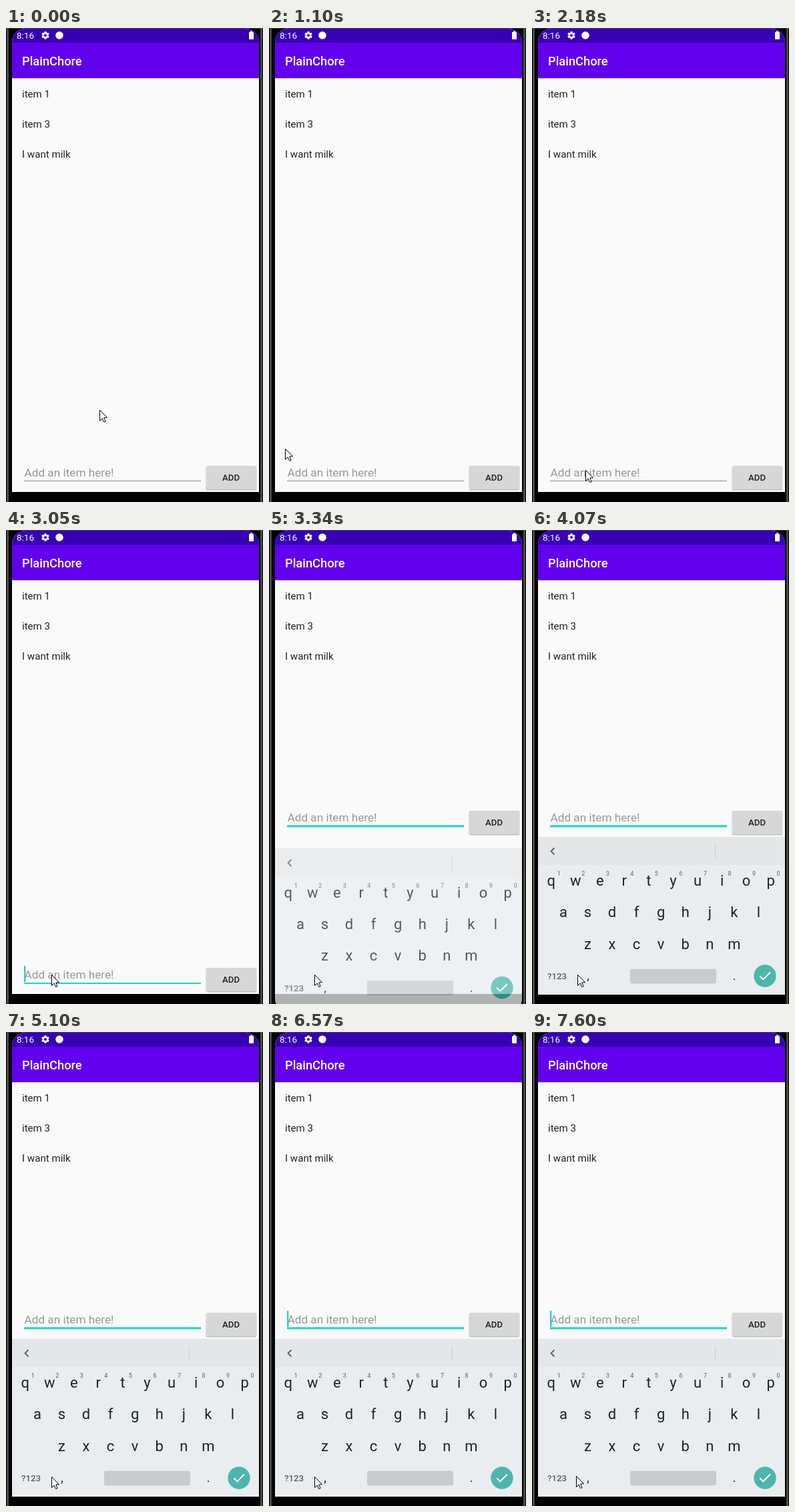
Animation, 385 px wide and 709 px high, one loop 8 s. Source, as an HTML page with a canvas:

```html
<!DOCTYPE html>
<html lang="en">
<head>
<meta charset="utf-8">
<title>To-do list</title>
<style>
html, body { margin: 0; width: 100%; height: 100%; overflow: hidden; background: #000; }
canvas { display: block; }
</style>
</head>
<body>
<canvas id="stage" width="385" height="709"></canvas>
<script>
const ctx = document.getElementById('stage').getContext('2d');
const LOOP = 8000, TICK = 125, BLINK = 493;
const FOCUS = 2480, KEYS_IN = 3340, KEYS_UP = 3480, BLINK_START = 3570;

// Pointer strokes: straight moves that advance one step per TICK
const STROKES = [
  { start: 305, steps: 4, from: [140, 571], to: [38, 617] },
  { start: 950, steps: 1, from: [38, 625], to: [24, 629] },
  { start: 1780, steps: 2, from: [36, 649], to: [80, 661] },
  { start: 2910, steps: 1, from: [71, 664], to: [68, 665] },
  { start: 6875, steps: 1, from: [68, 665], to: [66, 664] },
];

function rect(x, y, w, h, color, radius = 0) {
  ctx.fillStyle = color;
  ctx.beginPath();
  ctx.roundRect(x, y, w, h, radius);
  ctx.fill();
}

function disc(x, y, r, color) {
  ctx.fillStyle = color;
  ctx.beginPath();
  ctx.arc(x, y, r, 0, 2 * Math.PI);
  ctx.fill();
}

function line(points, color, width) {
  ctx.strokeStyle = color;
  ctx.lineWidth = width;
  ctx.beginPath();
  points.forEach(([x, y]) => ctx.lineTo(x, y));
  ctx.stroke();
}

function text(str, x, y, size, color, { weight = 400, spacing = 0, align = 'left' } = {}) {
  ctx.font = `${weight} ${size}px Roboto, sans-serif`;
  ctx.letterSpacing = spacing + 'px';
  ctx.textAlign = align;
  ctx.fillStyle = color;
  ctx.fillText(str, x, y);
}

function drawBezel() {
  rect(0, 0, 385, 709, '#000');
  rect(0, 0, 385, 1, '#444');
  rect(1, 0, 3, 709, '#4a4a4a');
  rect(381, 0, 3, 709, '#4a4a4a');
}

function drawGear(x, y) {
  for (let i = 0; i < 6; i++) {
    const a = (i + 0.5) * Math.PI / 3;
    line([[x, y], [x + 5.8 * Math.cos(a), y + 5.8 * Math.sin(a)]], '#fff', 3);
  }
  disc(x, y, 4.5, '#fff');
  disc(x, y, 2, '#3700b3');
}

function drawApp() {
  rect(9, 1, 370, 693, '#fafafa');
  rect(9, 75, 370, 1, '#dcd8e2');
  rect(9, 1, 370, 21, '#3700b3');
  rect(9, 22, 370, 53, '#6200ee');
  text('8:16', 16, 16, 13.5, '#fff');
  drawGear(59, 11);
  disc(80, 11, 5.8, '#fff');
  rect(364, 6, 7, 11, '#fff', 1);
  rect(366, 4.5, 3, 2, '#fff');
  text('PlainChore', 24, 56, 18.3, '#fff', { weight: 500 });
  ['item 1', 'item 3', 'I want milk'].forEach((item, i) =>
    text(item, 24, 103.5 + 45 * i, 15.1, '#222'));
}

function drawEntry(y, focused, raised, caret) {
  text('Add an item here!', 27.5, y + 19, 17.2, '#999');
  if (raised) rect(27, y + 24.5, 265, 3, '#1fd3c4');
  else if (focused) rect(27, y + 25, 265, 2, '#1fd3c4');
  else rect(27, y + 25, 265, 1, '#8c8c8c');
  if (caret) rect(27, y, 2.3, 24, '#1fd3c4');
  ctx.save();
  ctx.shadowColor = 'rgba(0,0,0,.35)';
  ctx.shadowBlur = 2;
  ctx.shadowOffsetY = 1;
  rect(300, y + 3, 75, 35, '#d6d7d7', 2);
  ctx.restore();
  text('ADD', 324, y + 25, 13.2, '#222', { weight: 500 });
}

function drawKeyboard() {
  const ink = '#14282f', soft = '#566168';
  rect(9, 459, 370, 236, '#e9edf0');
  rect(9, 459, 370, 42, '#e4e7e9');
  line([[33.5, 475.5], [28.5, 480.5], [33.5, 485.5]], soft, 1.8);
  rect(274, 470, 1, 21, '#c9cdd0');
  ['qwertyuiop', 'asdfghjkl', 'zxcvbnm'].forEach((row, r) => {
    const left = 28.7 + 18.27 * [0, 1, 3][r];
    [...row].forEach((key, i) => {
      const x = left + 36.55 * i;
      text(key, x, 532 + 47.4 * r, 22, ink, { align: 'center' });
      if (r === 0) text((i + 1) % 10, x + 11.5, 517, 9, soft, { align: 'center' });
    });
  });
  text('?123', 23, 672, 13.3, soft, { weight: 500 });
  text(',', 84, 673, 18, ink, { align: 'center' });
  text('.', 303, 673, 18, ink, { align: 'center' });
  rect(147, 656.5, 129, 22, '#c8cccf', 3);
  disc(349, 667, 16.7, '#4db6ac');
  line([[341.3, 667.3], [346.3, 672.3], [357, 661.5]], '#fff', 2);
}

// The keyboard enters slightly low, with the backdrop showing through
function drawRisingKeyboard() {
  ctx.save();
  ctx.translate(0, 17.5);
  drawKeyboard();
  ctx.restore();
  rect(9, 476.5, 370, 217.5, 'rgba(250,250,250,.25)');
  rect(9, 694, 370, 15, 'rgba(0,0,0,.25)');
}

function drawPointer(t) {
  if (t >= 1220 && t < 1780) return;
  const { start, steps, from, to } = STROKES.findLast(s => s.start <= t) ?? STROKES[0];
  const done = Math.min(1, Math.max(0, Math.floor((t - start) / TICK) / steps));
  const [x, y] = from.map((v, i) => Math.round(v + (to[i] - v) * done));
  ctx.save();
  ctx.translate(x + 0.5, y + 0.5);
  ctx.beginPath();
  [[0, 0], [0, 16], [3.7, 12.5], [6.2, 18], [8.6, 17], [6.2, 11.5], [11, 11.2]]
    .forEach(([px, py]) => ctx.lineTo(px, py));
  ctx.closePath();
  ctx.fillStyle = '#fff';
  ctx.strokeStyle = '#000';
  ctx.lineWidth = 1;
  ctx.fill();
  ctx.stroke();
  ctx.restore();
}

function caretVisible(t) {
  if (t < BLINK_START) return t >= FOCUS && t < KEYS_IN;
  return Math.floor((t - BLINK_START) / BLINK) % 2 === 0;
}

function draw(t) {
  const raised = t >= KEYS_IN;
  drawBezel();
  ctx.save();
  ctx.beginPath();
  ctx.roundRect(9, 1, 370, 720, 20);
  ctx.clip();
  drawApp();
  drawEntry(raised ? 417 : 652, t >= FOCUS, raised, caretVisible(t));
  if (t >= KEYS_UP) drawKeyboard();
  else if (raised) drawRisingKeyboard();
  ctx.restore();
  drawPointer(t);
}

const start = performance.now();
function tick() {
  draw((performance.now() - start) % LOOP);
  requestAnimationFrame(tick);
}
tick();
</script>
</body>
</html>
```
